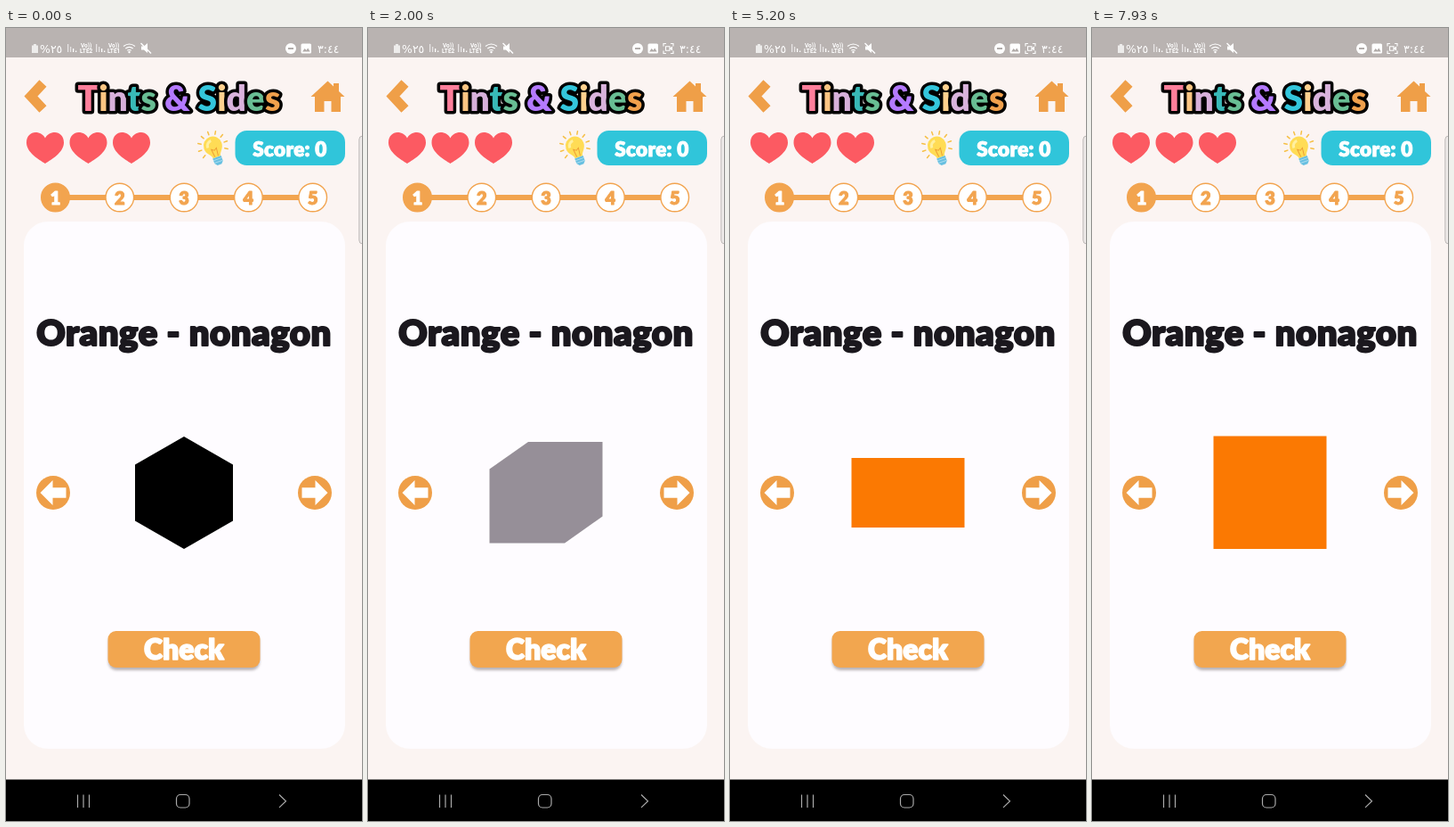
Animation of 400 by 889 pixels, one loop 8 s. Source, as an HTML page:

```html
<!DOCTYPE html>
<html lang="en">
<head>
<meta charset="utf-8">
<title>Shape game</title>
<style>
  html, body { margin: 0; width: 100%; height: 100%; overflow: hidden; background: #fbf4f2; }
  svg { display: block; width: 100vw; height: 100vh; }
  text { font-family: Lato, "Open Sans", sans-serif; font-weight: 900; text-anchor: middle; }
  .fat { paint-order: stroke; stroke-linejoin: round; }
  .status text { font: 400 12.5px "DejaVu Sans", "Noto Sans", sans-serif; text-anchor: start; fill: #fff; }
  .status .tiny { font: 700 6.5px Roboto, "Noto Sans", sans-serif; }
  .line { fill: none; stroke: #fff; stroke-width: 1.1; }
</style>
</head>
<body>
<svg viewBox="0 0 400 889" preserveAspectRatio="none">
  <defs>
    <path id="heart" fill="#fc5a62" d="M0 17.5C-7 13-21 5-21-6C-21-13.500-16-17.500-11-17.500C-6-17.500-2-15 0-11C2-15 6-17.500 11-17.500C16-17.500 21-13.500 21-6C21 5 7 13 0 17.500Z"/>
    <g id="arrow">
      <circle r="19" fill="#ef9f48"/>
      <path fill="#fff" d="M14.500 0L.5-14V-5.700H-14.500V5.700H.5V14Z"/>
    </g>
    <g id="bars" fill="#fff">
      <path opacity=".65" d="M0 18h1.300v9H0zM3 21h1.300v6H3z"/>
      <path d="M6 23h1.300v4H6zM9 25.500h1.300v1.500H9z"/>
    </g>
    <filter id="soft" x="-20%" y="-40%" width="140%" height="200%"><feGaussianBlur stdDeviation="1.8"/></filter>
  </defs>

  <rect width="400" height="889" fill="#fbf4f2"/>

  <g class="status">
    <rect width="400" height="33" fill="#b9b3b1"/>
    <path fill="#fff" opacity=".75" d="M31 18h3v1.500h2V28h-7v-8.500h2z"/>
    <text x="38" y="27.500" direction="ltr">%٢٥</text>
    <use href="#bars" x="69"/>
    <text class="tiny" x="84" y="21.500">Vo))</text>
    <text class="tiny" x="83" y="28">LTE2</text>
    <use href="#bars" x="101"/>
    <text class="tiny" x="115" y="21.500">Vo))</text>
    <text class="tiny" x="114" y="28">LTE1</text>
    <path class="line" d="M132 20.500Q138.500 15.500 145 20.500M134.300 23Q138.500 19.700 142.700 23M136.300 25.300Q138.500 23.600 140.700 25.300"/>
    <circle cx="138.500" cy="27" r="1.200" fill="#fff"/>
    <path fill="#fff" d="M152 20.500h3l4-3.500v11l-4-3.500h-3z"/>
    <path d="M151.500 17L163 28.500" stroke="#fff" stroke-width="1.400"/>
    <g id="notes">
      <circle cx="320" cy="23" r="6" fill="#fff"/>
      <path d="M317 23h6" stroke="#aaa4a2" stroke-width="1.800"/>
      <rect x="331.500" y="17.500" width="11.500" height="11" rx="1.500" fill="#fff"/>
      <path fill="#b0aaa8" d="M333 26.500l2.700-3.500 1.800 2 1.700-2.500 2.500 4z"/>
    </g>
    <g id="rec">
      <path class="line" d="M332 20.500v-3h3M340 17.500h3v3M343 25.500v3h-3M335 28.500h-3v-3"/>
      <path id="cam" class="line" d="M334.500 20.800h4.500v4.500h-4.500zM339.500 23l2-1.500v3z"/>
    </g>
    <text x="350" y="27.500" direction="ltr">٣:٤٤</text>
  </g>

  <path d="M41.500 62L28 76.500L41.500 91" fill="none" stroke="#ef9f48" stroke-width="11"/>
  <path fill="#ef9f48" d="M361.500 59.500L368 65.500V62h6v9l6.500 6H376V94H365.500V82H357.500V94H347V77H342.500Z"/>

  <text id="title" class="fat" x="194.500" y="93" font-size="39" stroke="#000" stroke-width="7"></text>

  <use href="#heart" x="44" y="134.500"/>
  <use href="#heart" x="92.500" y="134.500"/>
  <use href="#heart" x="141" y="134.500"/>

  <g transform="translate(232.500 132.500) rotate(-20)">
    <g id="rays" stroke="#f6bf45" stroke-width="1.500" stroke-linecap="round"></g>
    <path fill="#ffdc55" d="M-4.500 13C-4.500 9-10.500 6.500-10.500-.5A10.500 10.500 0 0 1 10.500-.5C10.500 6.500 4.500 9 4.500 13Z"/>
    <path fill="#fff0a0" d="M-7.500 0A7.500 7.500 0 0 1 0-8V-5A5 5 0 0 0-4.500 0Z"/>
    <path d="M-2 12L-3 3L0 5L3 3L2 12" fill="none" stroke="#ee9f35"/>
    <path fill="#67bfe0" d="M-5 13h10v6l-2.500 3h-5l-2.500-3z"/>
    <path d="M-5 15.500h10M-5 18.500h10" stroke="#a9dcef"/>
  </g>

  <rect x="257.500" y="115" width="123.500" height="39" rx="13" fill="#30c5da"/>
  <text class="fat" x="319" y="144" font-size="22.500" letter-spacing=".3" fill="#fff" stroke="#fff" stroke-width="1">Score: 0</text>

  <path d="M55 190H345" stroke="#f2a44f" stroke-width="6"/>
  <g id="steps"></g>

  <rect x="20" y="217" width="361" height="591" rx="27" fill="#fefcff"/>
  <text class="fat" x="200" y="355.500" font-size="40" letter-spacing=".5" fill="#1b181e" stroke="#1b181e" stroke-width="2">Orange - nonagon</text>

  <polygon id="shape"/>
  <path id="edge" d="M180 464.400H263.500" stroke="#c8607e"/>

  <use href="#arrow" transform="translate(53 521) scale(-1 1)"/>
  <use href="#arrow" x="347" y="521"/>

  <rect x="115" y="679" width="170" height="41" rx="9" fill="#8a8286" opacity=".6" filter="url(#soft)"/>
  <rect x="114.500" y="676" width="171" height="41" rx="9" fill="#f2a64f"/>
  <text class="fat" x="200" y="707.500" font-size="32" fill="#fff" stroke="#fff" stroke-width="1.600">Check</text>

  <rect x="396.800" y="121" width="10" height="121" rx="4" fill="#eeeae9" stroke="#bdb8b7"/>

  <rect y="842.500" width="400" height="47"/>
  <g fill="none" stroke="#aaa" stroke-width="1.200">
    <path d="M80.500 859.500v14.500M87 859.500v14.500M93.500 859.500v14.500M307 859.500l7.500 7.200l-7.500 7.200"/>
    <rect x="191.500" y="859.500" width="14.500" height="14.500" rx="4.500"/>
  </g>
</svg>

<script>
const NS = "http://www.w3.org/2000/svg";
const LOOP = 8000;
const ORANGE = "#fb7902", BLUE = "#5a87d0";
const $ = id => document.getElementById(id);

function add(parent, tag, attrs, text = "") {
  const el = document.createElementNS(NS, tag);
  for (const key in attrs) el.setAttribute(key, attrs[key]);
  el.textContent = text;
  parent.append(el);
}

const tints = ["#ff7f9b", "#fbc583", "#d7b0da", "#38b9b7", "#68bd93", "#b47aff",
               "#34c6dc", "#ffd18f", "#d9b3dc", "#68bd93", "#f0a04c"];
let tint = 0;
for (const ch of "Tints & Sides") {
  add($("title"), "tspan", ch === " " ? {} : { fill: tints[tint++] }, ch);
}

for (let i = 0; i < 5; i++) {
  const x = 55.5 + i * 72.3;
  const color = i ? "#f2a44f" : "#fff";
  add($("steps"), "circle", { cx: x, cy: 190, r: 15.8, fill: i ? "#fff" : "#f2a44f", stroke: "#f2a44f", "stroke-width": 1.4 });
  add($("steps"), "text", { class: "fat", x, y: 198, "font-size": 20, fill: color, stroke: color, "stroke-width": 1 }, i + 1);
}

for (let a = -120; a <= 120; a += 30) {
  add($("rays"), "path", { d: "M0-13.500V-17", transform: `rotate(${a})` });
}

const shapes = {
  hexagon: "200,458 255,489.5 255,552.5 200,584 145,552.5 145,489.5",
  octagon: "174,458 226,458 263.5,495 263.5,547 226,584 174,584 136.5,547 136.5,495",
  block: "180,464 263.5,464 263.5,547.5 221,577.5 136.5,577.5 136.5,494.5",
  rect: "136.5,482 263.5,482 263.5,560 136.5,560",
  triangle: "200,473 263.5,569 136.5,569",
  square: "136.5,457.5 263.5,457.5 263.5,584 136.5,584"
};

// [start ms, shape, colour]
const table = [
  [0, "hexagon", "#000"],
  [870, "octagon", "#000"],
  [1400, "block", "#000"],
  [2000, "block", "#968f98"],
  [3000, "block", "#c8607e"],
  [3200, "block", BLUE],
  [4000, "block", ORANGE],
  [5000, "rect", ORANGE],
  [5930, "triangle", ORANGE],
  [7200, "square", ORANGE]
];

const show = (id, on) => $(id).setAttribute("visibility", on ? "visible" : "hidden");

function draw(t) {
  const [, name, color] = table.findLast(row => row[0] <= t);
  $("shape").setAttribute("points", shapes[name]);
  $("shape").setAttribute("fill", color);
  show("edge", color === BLUE);

  const slide = Math.min(1, Math.max(0, (t - 70) / 200));
  $("notes").setAttribute("transform", `translate(${-17 * slide} 0)`);
  $("rec").setAttribute("opacity", slide);
  show("cam", (t + 976) % 988 < 475);
}

const start = performance.now();
function tick() {
  draw((performance.now() - start) % LOOP);
  requestAnimationFrame(tick);
}
tick();
</script>
</body>
</html>
```
